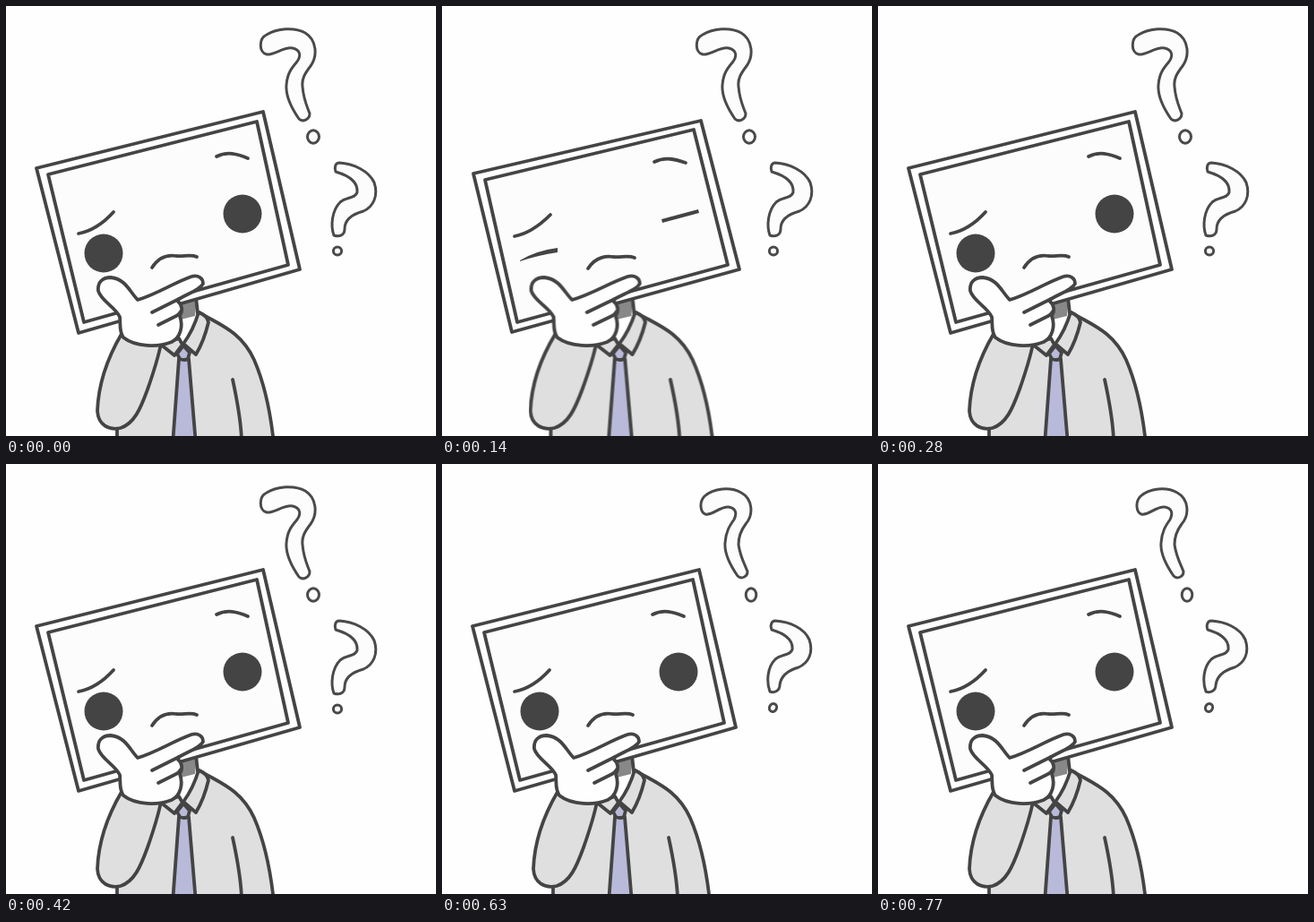
Recreate the animation shown at these times as an HTML page. Size 480 by 480 pixels, loop 0.84 s.

```html
<!DOCTYPE html>
<html lang="en">
<head>
<meta charset="utf-8">
<title>Thinking</title>
<style>
  html, body { margin: 0; width: 100%; height: 100%; overflow: hidden; background: #fefefe; }
  svg { display: block; width: 100vw; height: 100vh; }
  .ink { fill: none; stroke: #444; stroke-width: 3.8; stroke-linecap: round; stroke-linejoin: round; }
  .white { fill: #fefefe; }
  .screen { fill: #fcfcfc; }
  .cloth { fill: #dfdfdf; }
  .tie { fill: #b9b9d9; }
  .solid { fill: #444; stroke: none; }
  .mark { fill: #fcfcfc; stroke: #4a4a4a; stroke-width: 3; stroke-linejoin: round; }

  .open, .half, .shut, .sway { animation: 840ms step-end infinite; }
  .open { animation-name: open; }
  .half { animation-name: half; visibility: hidden; }
  .shut { animation-name: shut; visibility: hidden; }
  .sway { animation-name: sway; transform-origin: 199px 0; }
  .a, .b { animation: flip 140ms step-end infinite; }
  .b { animation-delay: -70ms; }

  @keyframes open {
    0%, 33.333% { visibility: visible; }
    8.333% { visibility: hidden; }
  }
  @keyframes half {
    0%, 16.667%, 33.333% { visibility: hidden; }
    8.333%, 25% { visibility: visible; }
  }
  @keyframes shut {
    0%, 25% { visibility: hidden; }
    16.667% { visibility: visible; }
  }
  @keyframes sway {
    0%, 33.333% { transform: none; }
    8.333%, 25% { transform: translateY(-1.5px) scaleX(1.03); }
    16.667% { transform: scaleX(1.035); }
  }
  @keyframes flip {
    0% { visibility: visible; }
    50% { visibility: hidden; }
  }
</style>
</head>
<body>
<svg viewBox="0 0 480 480">
  <g class="ink sway">
    <!-- torso and neck -->
    <path class="cloth" d="M124 490V470L150 400L174 378L216 342C236 355 262 362 277 395C290 425 295 455 298 480L299 490Z"/>
    <path class="white" stroke="none" d="M190 330H213L214 343L199 377L186 385L174 377Z"/>
    <path fill="#888" stroke="none" d="M194 325H213L211 346L195 350Z"/>
    <path d="M212 325L214 343"/>
    <path d="M253 417C258 440 262 460 263 484"/>
    <!-- tie and collar -->
    <path class="tie" d="M193 394L204 394L212 490H186Z"/>
    <path class="tie" d="M198 379L191 388L194 394Q199 396 203 394L205 387Z"/>
    <path class="cloth" d="M173 378L188 390L197 378L193 371Z"/>
    <path class="cloth" d="M215 342Q225 346 226 353Q221 374 212 389L198 377Q209 362 215 342Z"/>
    <!-- raised arm -->
    <path class="cloth" d="M129 366C112 395 103 425 102 452C103 468 115 474 128 471C143 466 150 450 158 428C165 408 170 392 173 377Z"/>
  </g>

  <g class="ink open">
    <path class="white" d="M34 181L287 118L328 294L81 365Z"/>
    <path class="screen" d="M47 188L280 129L315 289L87 353Z"/>
    <path d="M81 254C97 251 110 241 120 230M235 168C247 162 258 165 270 170"/>
    <path d="M163 292C172 278 184 278 190 279C198 280 206 277 213 280"/>
    <circle class="solid" cx="109" cy="276" r="21.5"/>
    <circle class="solid" cx="264" cy="232" r="21.5"/>
  </g>
  <g class="ink half">
    <path class="white" d="M36 183L290 123L331 293L79 363Z"/>
    <path class="screen" d="M48 191L282 134L319 287L85 352Z"/>
    <path d="M81 254C97 251 111 241 122 230M237 171C249 165 260 168 272 172"/>
    <path d="M163 291C172 277 185 277 191 278C200 279 207 276 215 279"/>
    <path class="solid" d="M88 274C98 265 113 260 127 260Q131 266 130 274Q129 284 124 288L97 292Q88 284 88 274Z"/>
    <path class="solid" d="M246 223C257 216 272 215 285 217Q288 224 287 233Q285 243 280 247L251 250Q245 243 245 235Z"/>
  </g>
  <g class="ink shut">
    <path class="white" d="M35 187L289 128L332 294L78 364Z"/>
    <path class="screen" d="M48 194L281 138L319 289L84 353Z"/>
    <path d="M81 257C97 254 110 244 121 233M237 174C249 168 260 171 272 175"/>
    <path d="M163 293C172 279 185 279 191 280C200 281 207 278 215 281"/>
    <path class="solid" d="M87 284Q105 273 129 270L129 275Q108 278 87 285Z"/>
    <path class="solid" d="M245 238L286 227L287 231L246 242Z"/>
  </g>

  <!-- hand on the chin -->
  <g class="ink sway">
    <path class="white" d="M131 370C126 363 128 356 127 347C122 336 106 329 103 318C102 308 108 303 117 303C134 305 138 319 147 328C168 322 187 309 207 302C215 300 220 304 220 310C217 316 208 319 193 327L192 330C196 333 198 340 194 346C198 357 195 370 185 375C170 381 145 381 131 370Z"/>
    <path d="M163 342L193 327M170 356L188 347Q193 345 195 341"/>
  </g>

  <g class="mark a">
    <path d="M291 54C282 52 282 36 291 32C302 25 322 23 334 30C347 38 348 56 340 67C333 76 330 82 331 90C332 104 336 112 339 120C339 127 331 130 327 126C318 113 312 100 313 88C314 75 319 69 325 62C330 55 328 49 320 47C310 45 300 55 291 54Z"/>
    <ellipse cx="343" cy="146" rx="6.5" ry="7.2"/>
    <path d="M372 175C388 176 405 184 411 197C416 212 410 224 399 229C384 233 378 240 378 249C378 256 372 258 366 256C362 245 364 228 373 219C380 213 390 215 392 208C393 198 385 190 368 185C366 180 368 175 372 175Z"/>
    <ellipse cx="370" cy="273.5" rx="4.6" ry="4.4"/>
  </g>
  <g class="mark b">
    <path d="M294 56C288 54 287 42 293 36C303 27 322 25 334 32C347 39 348 57 339 67C333 75 331 82 331 90C333 104 338 112 341 120C341 126 334 129 330 125C321 112 315 100 316 88C317 75 321 69 326 62C330 54 327 49 320 48C310 47 302 58 294 56Z"/>
    <ellipse cx="345" cy="146" rx="5.8" ry="7.2"/>
    <path d="M372 175C388 176 404 183 410 196C415 211 409 222 398 227C384 231 378 238 377 247C377 253 371 256 366 254C362 243 363 227 372 218C379 212 389 214 391 207C392 197 385 190 368 185C366 180 368 175 372 175Z"/>
    <ellipse cx="369.5" cy="272" rx="4" ry="4.6" transform="rotate(25 369.5 272)"/>
  </g>
</svg>
</body>
</html>
```
